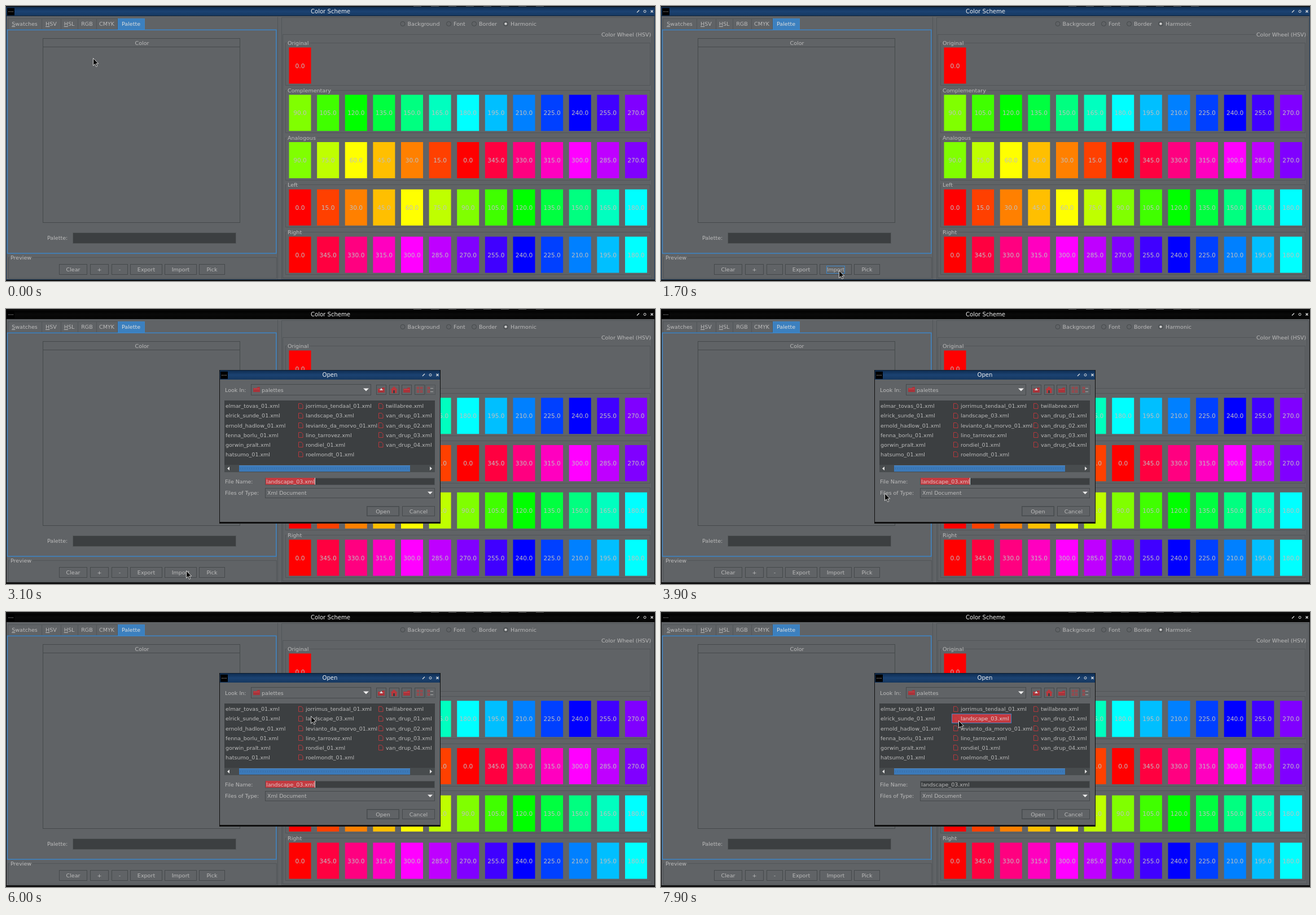
Animation of 1150x487 px, one loop 8 s. Source, as an HTML page with a canvas:

```html
<!DOCTYPE html>
<html lang="en">
<head>
<meta charset="utf-8">
<title>Color Scheme</title>
<style>
html, body { margin: 0; width: 100%; height: 100%; overflow: hidden; background: #606366; }
canvas { display: block; width: 1150px; height: 487px; }
</style>
</head>
<body>
<canvas id="stage" width="1150" height="487"></canvas>
<script>
const LOOP = 8000;
const ctx = document.getElementById('stage').getContext('2d');
const FONT = '"DejaVu Sans", sans-serif';
const BG = '#606366', DARK = '#3c3f41', EDGE = '#45494b', FAINT = '#515558';
const TEXT = '#bbbbbb', BLUE = '#3d85c6', RED = '#c43a40';

function fill(x, y, w, h, color) {
  ctx.fillStyle = color;
  ctx.fillRect(x, y, w, h);
}

function frame(x, y, w, h, color = EDGE) {
  ctx.strokeStyle = color;
  ctx.lineWidth = 1;
  ctx.strokeRect(x + 0.5, y + 0.5, w - 1, h - 1);
}

function text(str, x, y, { size = 9.55, color = TEXT, align = 'left' } = {}) {
  ctx.font = `${size}px ${FONT}`;
  ctx.fillStyle = color;
  ctx.textAlign = align;
  ctx.fillText(str, x, y);
}

function poly(points, color) {
  ctx.beginPath();
  points.forEach(([x, y]) => ctx.lineTo(x, y));
  ctx.closePath();
  ctx.fillStyle = color;
  ctx.fill();
}

function line(x1, y1, x2, y2, color, width = 1) {
  ctx.strokeStyle = color;
  ctx.lineWidth = width;
  ctx.beginPath();
  ctx.moveTo(x1, y1);
  ctx.lineTo(x2, y2);
  ctx.stroke();
}

function ring(x, y, r, color) {
  ctx.strokeStyle = color;
  ctx.lineWidth = 1;
  ctx.beginPath();
  ctx.arc(x, y, r, 0, Math.PI * 2);
  ctx.stroke();
}

function button(label, x, y, w, h) {
  frame(x, y, w, h);
  text(label, x + w / 2, y + h / 2 + 3.5, { align: 'center' });
}

// Title bar with an icon at the left and window controls at the right
function titleBar(x, y, w, h, title, active) {
  const shade = ctx.createLinearGradient(0, y, 0, y + h);
  shade.addColorStop(0, active ? '#0e2c50' : '#000000');
  shade.addColorStop(0.5, active ? '#1b4272' : '#090909');
  shade.addColorStop(1, active ? '#163860' : '#050505');
  fill(x, y, w, h, shade);
  const mid = y + h / 2;
  fill(x + 1, mid - 6, 13, 13, '#000');
  for (let i = 0; i < 4; i++) fill(x + 3 + i * 2.5, mid, 1.5, 1, '#999');
  text(title, x + w / 2, mid + 3, { size: 10.1, color: '#eeeeee', align: 'center' });
  const right = x + w;
  line(right - 31, mid + 2, right - 27, mid - 2, '#ddd', 1.2);
  ring(right - 17, mid, 2, '#ddd');
  line(right - 6.5, mid - 2, right - 2.5, mid + 2, '#ddd', 1.2);
  line(right - 6.5, mid + 2, right - 2.5, mid - 2, '#ddd', 1.2);
}

function group(label, x, y, w, h, onRight) {
  frame(x, y, w, h, FAINT);
  ctx.font = `9.55px ${FONT}`;
  const width = ctx.measureText(label).width;
  const left = onRight ? x + w - 2 - width : x + 4;
  fill(left - 2, y - 2, width + 4, 5, BG);
  text(label, left, y + 3.5);
}

function leftPanel(importFocus) {
  const tabs = [['Swatches', 3, 60], ['HSV', 63, 34], ['HSL', 97, 30], ['RGB', 127, 33], ['CMYK', 160, 37], ['Palette', 198, 47]];
  tabs.forEach(([label, x, w], i) => {
    const active = i === 5;
    if (active) fill(x, 22, w, 20, '#3c80bf');
    frame(x, 22, w + 1, 20, active ? BLUE : FAINT);
    text(label, x + w / 2, 35, { align: 'center', color: active ? '#dddddd' : TEXT });
    if (i < 3) {
      const first = ctx.measureText(label[0]).width;
      fill(x + w / 2 - ctx.measureText(label).width / 2, 36, first, 1, TEXT);
    }
  });
  ctx.strokeStyle = BLUE;
  ctx.lineWidth = 1.5;
  ctx.strokeRect(2.5, 42.3, 476.3, 395.7);

  frame(65, 57, 350, 327);
  frame(65, 57, 350, 16);
  text('Color', 241, 69, { align: 'center' });
  text('Palette:', 73, 414);
  fill(118, 401, 290, 20, DARK);
  frame(118, 401, 290, 20, '#55595b');

  group('Preview', 4, 445, 476, 38);
  [['Clear', 94, 50], ['+', 149, 33], ['-', 187, 29], ['Export', 220, 57], ['Import', 281, 57], ['Pick', 342, 46]]
    .forEach(([label, x, w]) => button(label, x, 457, w, 19));
  if (importFocus) frame(293, 460, 33, 14, BLUE);
}

function rightPanel() {
  frame(488, 20, 660, 464, FAINT);
  line(481.5, 19, 481.5, 484, FAINT);
  [['Background', 703], ['Font', 784.5], ['Border', 829.5], ['Harmonic', 885.5]].forEach(([label, x], i) => {
    ring(x, 31.5, 4, EDGE);
    if (i === 3) {
      ctx.fillStyle = '#d5d5d5';
      ctx.beginPath();
      ctx.arc(x, 31.5, 2.1, 0, Math.PI * 2);
      ctx.fill();
    }
    text(label, x + 8.5, 35);
  });
  group('Color Wheel (HSV)', 490, 50, 655, 432, true);
  // label, first hue, hue step, swatch count
  const rows = [['Original', 0, 0, 1], ['Complementary', 90, 15, 13], ['Analogous', 90, -15, 13], ['Left', 0, 15, 13], ['Right', 0, -15, 13]];
  rows.forEach(([label, start, step, count], r) => {
    const y = 65 + r * 83.75;
    group(label, 495, Math.round(y), 647, 76);
    for (let i = 0; i < count; i++) {
      const hue = (start + step * i + 360) % 360;
      const x = 501.5 + i * 49.62;
      fill(x, y + 8.5, 39, 64, `hsl(${hue}, 100%, 50%)`);
      text(hue.toFixed(1), x + 19.5, y + 44.5, { size: 10.6, color: '#c0c0c0', align: 'center' });
    }
  });
}

function folder(x, y) {
  poly([[x, y + 2], [x + 6, y + 2], [x + 8, y], [x + 12, y], [x + 12, y + 9], [x, y + 9]], '#a9333a');
  fill(x + 1, y + 3, 10, 1, '#d0484e');
}

function page(x, y) {
  ctx.strokeStyle = '#b8383d';
  ctx.lineWidth = 1;
  ctx.beginPath();
  ctx.moveTo(x + 5, y);
  ctx.lineTo(x, y);
  ctx.lineTo(x, y + 9);
  ctx.lineTo(x + 7.5, y + 9);
  ctx.lineTo(x + 7.5, y + 3);
  ctx.lineTo(x + 5, y);
  ctx.stroke();
}

function toolIcons() {
  [656, 679, 701].forEach(x => frame(x, 134, 18, 18));
  folder(659, 139);
  poly([[665, 140], [668, 144], [662, 144]], '#ddd');
  poly([[687.5, 137], [694, 143], [692.5, 143], [692.5, 149], [683, 149], [683, 143], [681, 143]], '#b8383d');
  fill(686, 144, 3, 5, DARK);
  folder(704, 139);
  frame(724, 134, 18, 18);
  for (let i = 0; i < 4; i++) frame(728 + (i % 2) * 6, 138 + (i >> 1) * 6, 4, 4, '#b8383d');
  frame(743, 134, 18, 18, FAINT);
  for (let i = 0; i < 2; i++) {
    frame(747, 138 + i * 6, 4, 4, '#b8383d');
    fill(752, 140 + i * 6, 5, 1, '#aaa');
  }
}

const FILE = 'landscape_03.xml';
const COLUMNS = [
  ['elmar_tovas_01', 'elrick_sunde_01', 'ernold_hadlow_01', 'fenna_borlu_01', 'gorwin_pralt', 'hatsumo_01'],
  ['jorrimus_tendaal_01', 'landscape_03', 'levianto_da_morvo_01', 'lino_tarrovez', 'rondiel_01', 'roelmondt_01'],
  ['twillabree', 'van_drup_01', 'van_drup_02', 'van_drup_03', 'van_drup_04']
];

function fileList(selected, editing, caret) {
  fill(387, 162, 373, 114, DARK);
  if (selected) {
    fill(516, 181, editing ? 15 : 104, 15, RED);
    if (!editing) frame(515, 180, 106, 17, '#4c7fc0');
  }
  COLUMNS.forEach((names, c) => names.forEach((name, r) => {
    const x = 389 + c * 142, y = 175.3 + r * 17.1;
    if (c) page(x - 12.5, y - 8);
    const hot = c === 1 && r === 1;
    if (hot && editing) {
      fill(530, 180, 127, 17, DARK);
      frame(515, 180, 142, 17, '#696d70');
      fill(531.5, 182, 87, 12, RED);
      if (caret) fill(619, 182, 1, 13, '#ddd');
    }
    text(name + '.xml', x, hot && editing ? y - 1 : y, { size: 9.5, color: hot && selected ? '#e0d0d0' : TEXT });
  }));
}

function scrollBar() {
  fill(387, 276, 373, 13, '#484c4e');
  fill(413, 277, 303, 11, '#3c79b8');
  fill(413, 277, 303, 1, '#4c8dd0');
  for (let x = 415; x < 715; x += 4) fill(x, 281, 1, 3, '#376fa9');
  poly([[392, 282.5], [396, 279], [396, 286]], '#ddd');
  poly([[755, 282.5], [751, 279], [751, 286]], '#ddd');
}

function dialog(t) {
  const selected = t >= 6100;
  const editing = t >= 6500 && t < 7700;
  const editCaret = t < 6700 || (t >= 6900 && t < 7300);
  // the text caret toggles at each of these times
  const toggles = [2400, 3100, 3500, 3900, 4300, 4700, 4900, 5600];
  const caret = toggles.filter(time => t >= time).length % 2 === 0;

  fill(378, 108, 392, 272, '#101010');
  titleBar(379, 108.5, 390, 16.5, 'Open', true);
  fill(379, 125, 390, 252, BG);

  text('Look In:', 388, 146.5);
  frame(434, 133, 213, 20);
  folder(438, 138);
  text('palettes', 453, 146.5);
  poly([[633, 140.5], [643, 140.5], [638, 145.5]], '#eee');
  toolIcons();

  fileList(selected, editing, editCaret);
  scrollBar();

  text('File Name:', 388, 309, { size: 9.4 });
  fill(459, 299, 301, 13, DARK);
  frame(459, 299, 301, 13, '#505457');
  if (!selected) {
    fill(460, 299, 87, 12, RED);
    if (caret) fill(547, 299, 1, 12, '#ddd');
  }
  text(FILE, 461, 308.7, { size: 9.5, color: selected ? TEXT : '#ddc8c8' });

  text('Files of Type:', 388, 329, { size: 9.4 });
  frame(459, 317, 301, 18);
  text('Xml Document', 463, 328.7, { size: 9.4 });
  poly([[747, 323.5], [756, 323.5], [751.5, 328]], '#eee');

  button('Open', 639, 349, 58, 18);
  frame(640, 350, 56, 16, '#54585b');
  button('Cancel', 702, 349, 58, 18);
}

// time, x, y of the pointer tip
const PATH = [
  [0, 154, 92], [200, 166, 120], [500, 240, 305], [800, 305, 452], [900, 312, 464], [1000, 314, 470],
  [1100, 314, 470], [1300, 315, 468], [1800, 315, 468], [1900, 316, 467], [2100, 316, 466],
  [2200, 317, 464], [3000, 318, 464], [3100, 319, 463], [3300, 319, 462], [3500, 345, 425],
  [3600, 345, 425], [3900, 396, 326], [4000, 410, 301], [4100, 410, 301], [4500, 448, 252],
  [4600, 448, 252], [4900, 509, 198], [5000, 509, 198], [5300, 534, 182], [5500, 534, 182],
  [5600, 539, 184], [5900, 540, 184], [6200, 540, 184], [6500, 575, 230], [6600, 575, 230],
  [6900, 615, 278], [7000, 615, 278], [7500, 529, 197], [7600, 529, 197], [7900, 527, 192]
];

function pointerAt(t) {
  const next = PATH.findIndex(p => p[0] > t);
  if (next < 0) return PATH[PATH.length - 1].slice(1);
  const [t0, x0, y0] = PATH[next - 1], [t1, x1, y1] = PATH[next];
  const k = (t - t0) / (t1 - t0);
  return [x0 + (x1 - x0) * k, y0 + (y1 - y0) * k];
}

function pointer(x, y) {
  const shape = [[0, 0], [0, 13], [3, 10.3], [5.2, 15], [7.3, 14], [5.2, 9.6], [9.2, 9.4]].map(([dx, dy]) => [x + dx + 0.5, y + dy + 0.5]);
  poly(shape, '#0a0a0a');
  ctx.strokeStyle = '#e8e8e8';
  ctx.lineWidth = 0.9;
  ctx.stroke();
}

function draw(t) {
  const open = t >= 1900;
  fill(0, 0, 1150, 487, '#111');
  for (let x = 722; x < 970; x += 31) fill(x, 0, 14, 1, '#555');
  fill(1, 18, 1148, 466, BG);
  titleBar(1, 1.5, 1148, 16, 'Color Scheme', !open);
  frame(0, 2, 1150, 483, open ? '#0a0a0a' : '#14304f');
  leftPanel(t >= 1700 && t < 1900);
  rightPanel();
  if (open) dialog(t);
  pointer(...pointerAt(t));
}

function tick(now) {
  draw(Math.floor(now % LOOP / 100) * 100);
  requestAnimationFrame(tick);
}
requestAnimationFrame(tick);
</script>
</body>
</html>
```
